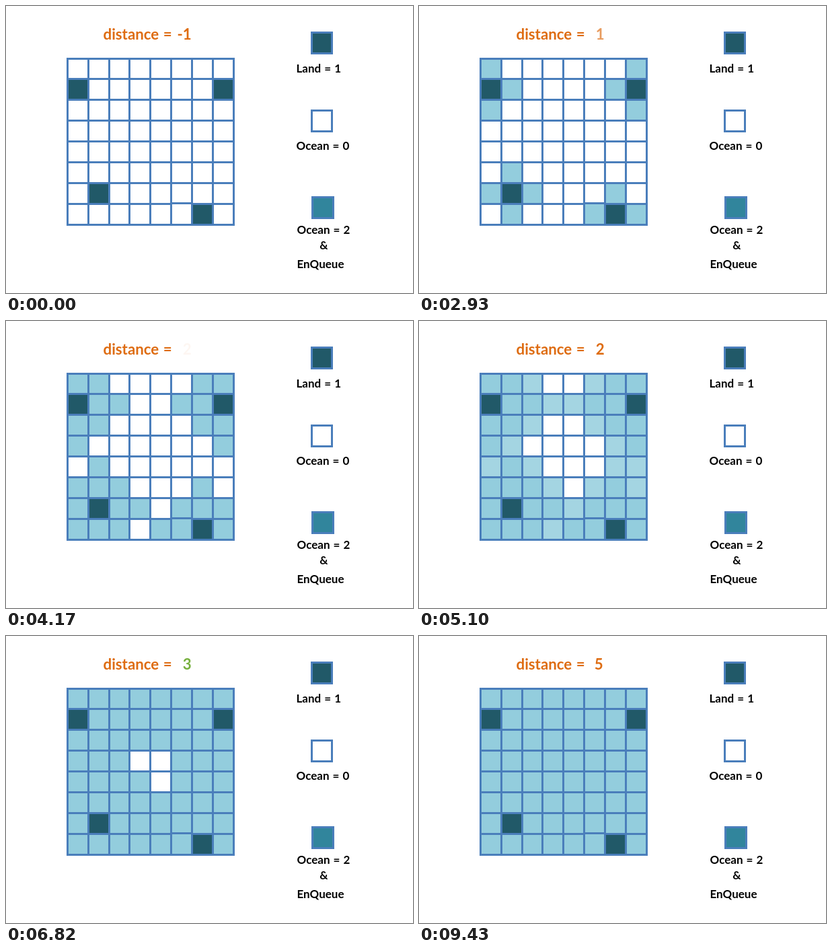
Animation of 605x427 px, one loop 9750 ms. Source, as an HTML page:

```html
<!DOCTYPE html>
<html lang="en">
<head>
<meta charset="utf-8">
<title>Distance from land</title>
<style>
  html, body { margin: 0; width: 100%; height: 100%; overflow: hidden; background: #fff; }
  svg { display: block; }
  text { font: 700 17px Lato, Carlito, sans-serif; word-spacing: 1px; }
  .title text { font-size: 22.3px; fill: #de6c12; }
  .title .green { fill: #69a82a; }
  .digit { text-anchor: middle; }
  rect { stroke: #4a7ebb; stroke-width: 3; }
  .land { fill: #215968; }
  .empty { fill: #fff; }
  .queued { fill: #31859c; }
  .reached { fill: #93cddd; }
</style>
</head>
<body>
<svg width="605" height="427" viewBox="0 0 605 427">
  <g class="title">
    <text x="144.5" y="50.3">distance =</text>
    <g id="counter">
      <text x="275.7" y="50.3" text-anchor="end">-1</text>
      <text class="digit" x="269.2" y="50.3">0</text>
      <text class="digit" x="269.2" y="50.3">1</text>
      <text class="digit" x="269.2" y="50.3">2</text>
      <text class="digit green" x="269.2" y="50.3">3</text>
      <text class="digit" x="269.2" y="50.3">4</text>
      <text class="digit" x="267.2" y="50.3">5</text>
    </g>
  </g>

  <g id="grid"></g>

  <rect class="land" x="454.5" y="39.5" width="30" height="31"/>
  <text x="431.5" y="99">Land = 1</text>
  <rect class="empty" x="454.5" y="155.5" width="30" height="31"/>
  <text x="431.5" y="214">Ocean = 0</text>
  <rect class="queued" x="455.5" y="284.5" width="31" height="31"/>
  <text x="432.5" y="339">Ocean = 2</text>
  <text x="472.5" y="362" text-anchor="middle">&amp;</text>
  <text x="432.5" y="390">EnQueue</text>
</svg>
<script>
  const LOOP = 9750;
  const SIZE = 8, PITCH = 30.875;
  const LANDS = [[1, 0], [1, 7], [6, 1], [7, 6]];

  // One round: old number out, new number in, then the next ring of cells.
  const START = 465, ROUND = 1570, DIGIT_FADE = 535, CELL_FADE = 500;
  const FIRST_STEP = 529, STEP = 77.39, LAST_STEP = 115;

  const grid = document.getElementById("grid");
  const numbers = [...document.getElementById("counter").children];

  function addGroup(className) {
    const group = document.createElementNS("http://www.w3.org/2000/svg", "g");
    group.setAttribute("class", className);
    return grid.appendChild(group);
  }

  function addCell(group, row, col) {
    const left = edgeX(col), top = edgeY(row, col);
    const cell = document.createElementNS("http://www.w3.org/2000/svg", "rect");
    const box = { x: left, y: top, width: edgeX(col + 1) - left, height: edgeY(row + 1, col) - top };
    for (const key in box) cell.setAttribute(key, box[key]);
    group.appendChild(cell);
  }

  const edgeX = col => 91.5 + Math.floor(col * PITCH + 0.3);
  // One cell in the bottom row sits a pixel high.
  const edgeY = (row, col) => 78.5 + Math.floor(row * PITCH) - (row === 7 && col === 5 ? 1 : 0);

  const distance = (row, col) =>
    Math.min(...LANDS.map(([r, c]) => Math.abs(r - row) + Math.abs(c - col)));

  const rings = [0, 1, 2, 3, 4, 5].map(d => addGroup(d ? "reached" : "land"));
  for (let row = 0; row < SIZE; row++)
    for (let col = 0; col < SIZE; col++)
      addCell(rings[distance(row, col)], row, col);

  const progress = (time, start, length) =>
    Math.min(1, Math.max(0, (time - start) / length));

  function draw(time) {
    const step = Math.min(LAST_STEP, Math.floor((time - FIRST_STEP) / STEP));
    const t = step < 0 ? 0 : FIRST_STEP + step * STEP;

    numbers.forEach((number, i) => {
      const leave = START + i * ROUND;
      const enter = leave - ROUND + DIGIT_FADE;
      const shown = i === 0 ? 1 : progress(t, enter, DIGIT_FADE);
      const gone = i === numbers.length - 1 ? 0 : progress(t, leave, DIGIT_FADE);
      number.style.opacity = shown - gone;
    });

    rings.forEach((ring, d) => {
      if (d === 0) return;
      const begin = START + (d - 1) * ROUND + 2 * DIGIT_FADE;
      ring.style.fillOpacity = progress(t, begin, CELL_FADE);
    });
  }

  const origin = performance.now();
  function tick() {
    draw((performance.now() - origin) % LOOP);
    requestAnimationFrame(tick);
  }
  tick();
</script>
</body>
</html>
```
